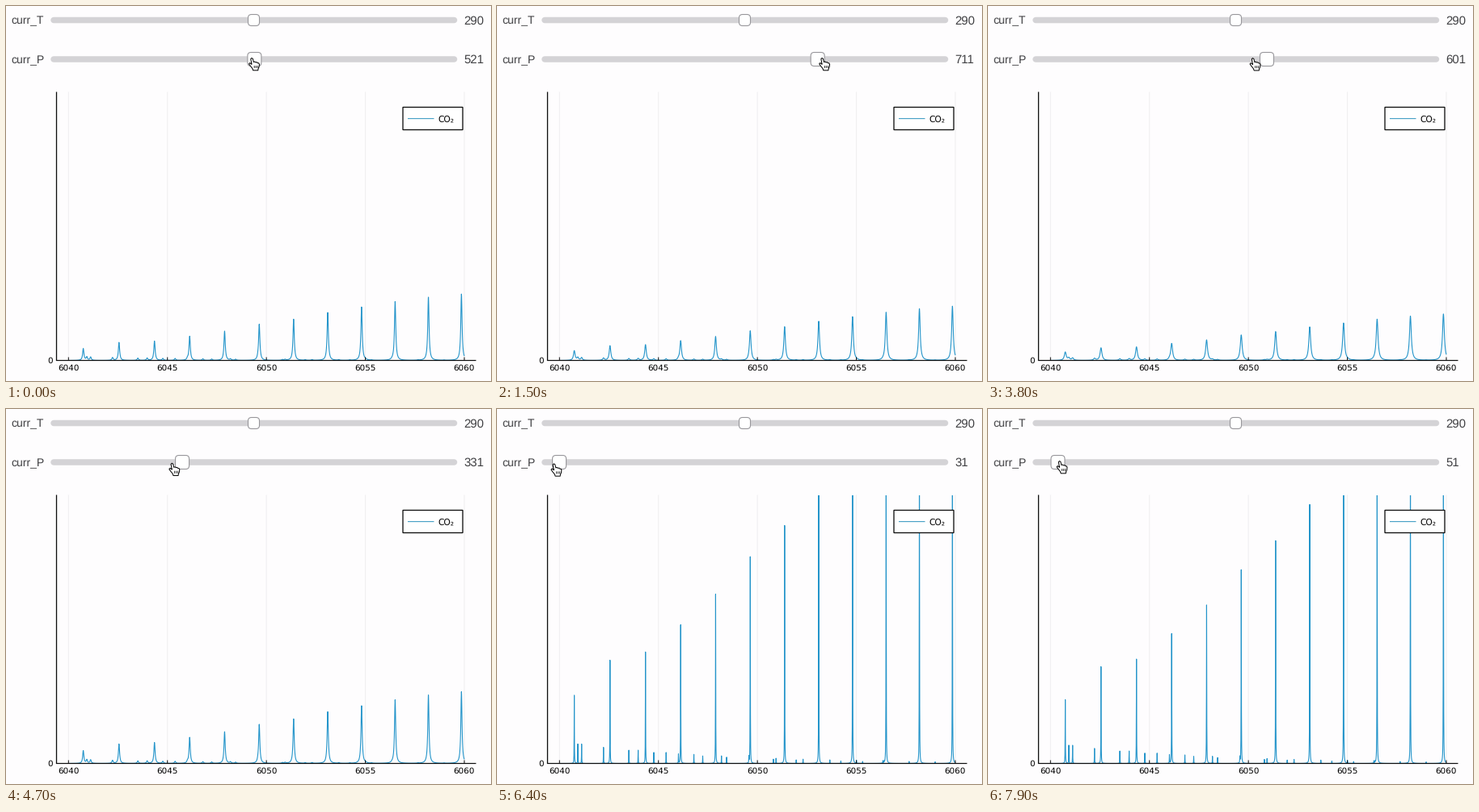
Write a matplotlib script that moves like this. It is 600 by 465 pixels and loops after 8 s.

```python
import numpy as np
import matplotlib.pyplot as plt
from matplotlib.animation import FuncAnimation
from matplotlib.patches import FancyBboxPatch, Polygon, Rectangle

W, H, DPI = 600, 465, 100
FRAMES, STEP = 80, 100
PX = 72 / DPI  # points per pixel
INK, GREY, BLUE, BG = "#0c0c0c", "#404043", "#2394ca", "#fefdfe"
LEFT, TOP, BASE = 62.5, 106.5, 439.5
X0, X1 = 77.3, 567

plt.rcParams.update({"path.simplify": False, "path.snap": False, "text.hinting": "none"})
fig = plt.figure(figsize=(W / DPI, H / DPI), dpi=DPI, facecolor=BG)
ax = fig.add_axes([0, 0, 1, 1])
ax.set(xlim=(0, W), ylim=(H, 0))
ax.axis("off")


def line(x, y, color=INK, lw=1.0, z=2, cap="butt"):
    return ax.plot(x, y, color=color, lw=lw * PX, zorder=z, solid_capstyle=cap)[0]


def label(x, y, s, size, ha="left", color="black", font="DejaVu Sans"):
    return ax.text(x, y, s, fontsize=size * PX, family=font, color=color,
                   ha=ha, va="baseline", zorder=8)


# --- sliders ---
def slider(name, y, size, x=306.5):
    line([59, 554.5], [y, y], "#d4d3d6", 7.5, cap="round")
    label(6.5, y + 5, name, 14, color=GREY, font="Liberation Sans")
    value = label(566, y + 5.3, "290", 15, color=GREY, font="Liberation Sans")
    knob = FancyBboxPatch((x - size / 2, y - size / 2), size, size, fc="white",
                          ec="#98979b", boxstyle="round,pad=0,rounding_size=4.2",
                          lw=1.1 * PX, zorder=6)
    return ax.add_patch(knob), value


slider("curr_T", 17.5, 14)
knob_p, value_p = slider("curr_P", 66, 17)

# --- axes ---
for k, x in enumerate(np.linspace(X0, X1, 5)):
    line([x, x], [TOP, BASE], "#efeef0", 1, z=1)
    line([x, x], [BASE - 4, BASE], lw=1, z=4)
    label(x, 451.8, str(6040 + 5 * k), 10.4, "center")
line([LEFT, LEFT], [TOP, BASE], lw=1.3, z=4)
line([LEFT - 0.6, 581.5], [BASE, BASE], lw=1.2, z=4)
label(57.5, 443.3, "0", 10.4, "right")

# --- legend ---
ax.add_patch(Rectangle((491, 125.5), 74, 28, fc="white", ec=INK, lw=1.3 * PX, zorder=5))
line([497, 529.5], [139.6, 139.6], "#3f9cc4", 1.1, z=6)
label(534.7, 143.5, "CO₂", 10.6)

# --- spectral lines: one strong band and two weak hot bands ---
DOPPLER, OFFSET, PX_PER_P = 57, 28, 0.0018


def band(start, gap, bend, n):
    j = np.arange(n)
    return start + gap * j - bend * j ** 2


J = np.arange(40, 16, -2)
strong = 2280 * (2 * J + 1) * np.exp(-0.001934 * J * (J + 1))  # rotational population
hot = 2200 * np.exp(-0.19 * np.arange(14))
centre = np.r_[band(95.6, 44.384, 0.1688, 12), band(100, 32, 0.22, 14),
               band(104.7, 35.2, 0.12, 14)]
strength = np.r_[strong, hot, hot]

grid = np.sort(np.r_[np.linspace(X0, X1, 2001), centre])
dist2 = ((grid[:, None] - centre) / PX_PER_P) ** 2 + OFFSET ** 2


def spectrum(p):
    """Sum of Voigt-like profiles at pressure p."""
    g = 0.535 * p + np.sqrt(0.2166 * p * p + DOPPLER ** 2)
    return (strength * g / (g * g + dist2)).sum(axis=1)


curve = line(grid, grid * 0 + BASE, BLUE, 1.1, z=3)
curve.set_solid_joinstyle("round")
curve.set_clip_path(Rectangle((LEFT, TOP), 520, BASE - TOP + 2, transform=ax.transData))

# --- pointing hand ---
HAND = np.array([(-4.6, -6.4), (-3.4, -7.5), (-2, -6.5), (-1, -2.5), (0.5, -3),
                 (1.6, -2), (3, -2.4), (4, -1.2), (5.4, -1.2), (6.1, 0.5),
                 (5.7, 3.5), (4.6, 6), (4.4, 7.8), (-1.7, 7.8), (-2.5, 5.5),
                 (-5.3, 2), (-6.8, -0.2), (-5.8, -1.4), (-4.2, -0.4), (-3.4, 0.3)])
hand = ax.add_patch(Polygon(HAND, fc="white", ec="black", lw=PX,
                            joinstyle="round", zorder=9))
KNUCKLES = (-0.2, 1.8, 3.8)
creases = [line([0, 0], [0, 0], "black", 0.8, z=10) for _ in KNUCKLES]

# --- motion: (seconds, pressure) turning points of the drag ---
DRAG = np.array([(0.1, 521), (1.5, 711), (2.3, 861), (2.8, 861), (3, 841), (4.7, 331),
                 (5.7, 131), (6.4, 31), (7.1, -18), (7.3, -18), (8, 62.5)])


def drag(t):
    return np.interp(t, *DRAG.T)


def snap(p):
    return max(1, 1 + 10 * int(round((p - 1) / 10)))


def to_x(p):
    return 62.5 + 0.47 * p


def update(i):
    t = i * STEP / 1000
    p = snap(drag(t))
    knob_p.set_x(to_x(p) - knob_p.get_width() / 2)
    value_p.set_text(str(p))
    # the plot trails the slider, the hand leads it
    lag = np.interp(t, [5.7, 6.4], [0.5, 0.04])
    curve.set_ydata(BASE - spectrum(snap(drag(t - lag))))
    hx, hy = to_x(drag(t + 0.1)), 72 + 7.5 * np.exp(-((t - 5.6) / 0.9) ** 2)
    hand.set_xy(HAND + (hx, hy))
    for crease, dx in zip(creases, KNUCKLES):
        crease.set_data([hx + dx, hx + dx], [hy + 2, hy + 5])
    return [knob_p, value_p, curve, hand, *creases]


anim = FuncAnimation(fig, update, frames=FRAMES, interval=STEP,
                     repeat=True, repeat_delay=0, blit=False)
plt.show()
```
